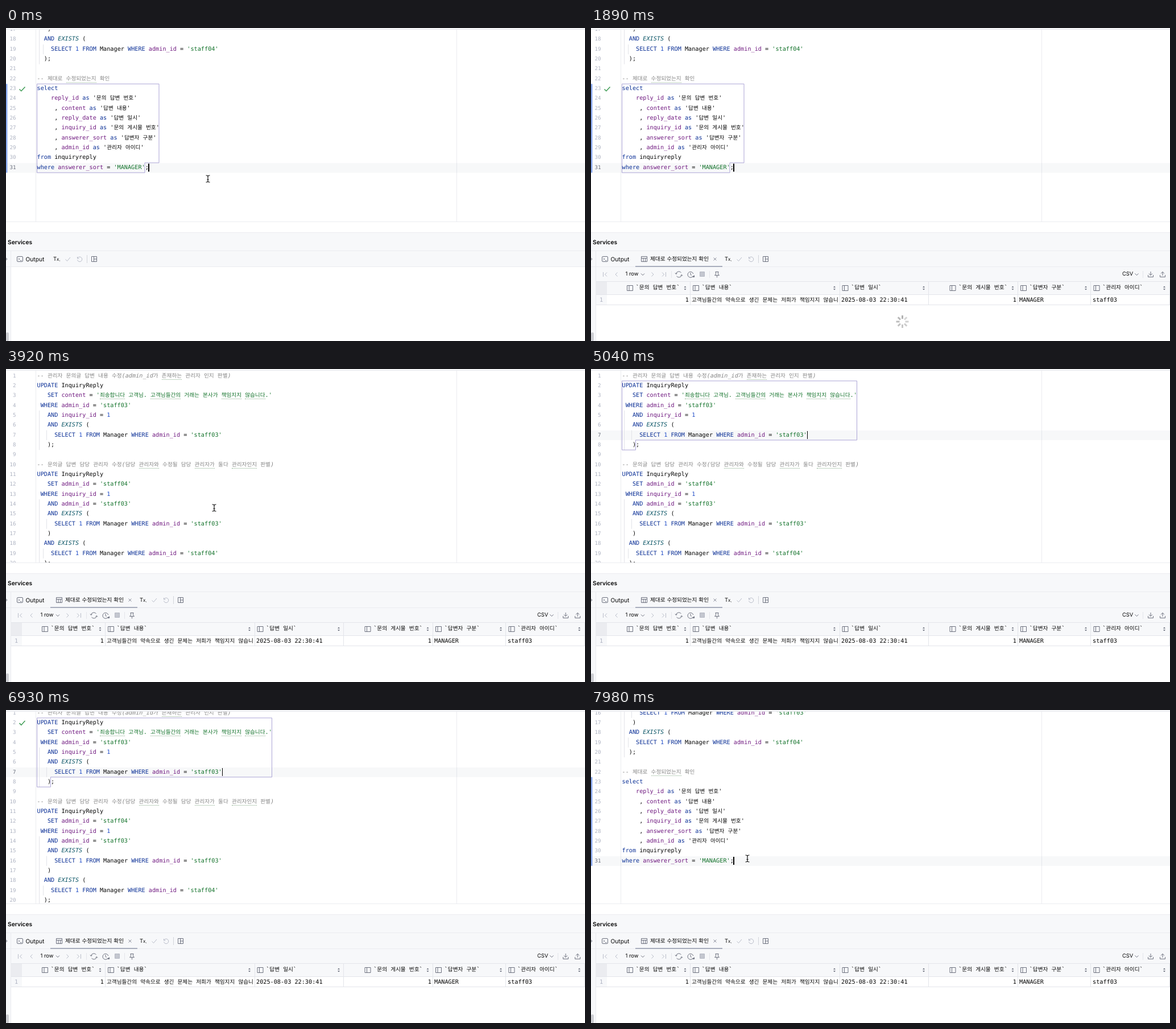
Recreate the animation shown at these times as an HTML page. Size 1018 by 550 pixels, loop 8 s.

```html
<!DOCTYPE html>
<html lang="ko">
<head>
<meta charset="utf-8">
<style>
html, body { margin: 0; width: 100%; height: 100%; overflow: hidden; background: #fff; }
body { position: relative; text-rendering: geometricPrecision; color: #050505; }
div, svg, .t { position: absolute; }
svg { left: 0; top: 0; overflow: visible; fill: none; stroke: #6c707e; }
.t { white-space: pre; line-height: 18px; font: 10.23px/18px Inter, sans-serif; }
.mono, .row { font: 10.2px/17.33px "DejaVu Sans Mono", monospace; white-space: pre; }
.mono { line-height: 18px; }
.small { font-size: 9.4px; }
.k { font: normal 9.62px/0 "Noto Sans CJK KR", "Noto Sans CJK", sans-serif; }
.typo { border-bottom: 1px dotted #86ab89; }
.bold { font-weight: 600; }
.dim { color: #aeb3c2; }
.kw { color: #0a2f96; }
.fn { color: #0b5566; font-style: italic; }
.col { color: #701a80; }
.str { color: #12722a; }
.num { color: #2450c8; }
.com { color: #868686; font-style: italic; }
.marked .str .typo { border-color: transparent; }
#editor { left: 0; top: 0; width: 1018px; height: 340px; overflow: hidden; }
#doc { left: 0; top: 0; width: 1018px; height: 560px; }
#current { left: 0; width: 1018px; height: 17.33px; background: rgba(60, 80, 115, .04); }
#caret { width: 1.6px; height: 14px; background: #000; }
.no { left: 0; width: 17.6px; text-align: right; font-size: 9.2px; color: #aeb3c2; }
.no.on { color: #686c7b; }
#popup { width: 340px; border-radius: 6px; background: #fff; overflow: hidden; }
#shadow { width: 340px; border-radius: 6px; box-shadow: 0 1px 6px rgba(0, 0, 0, .32), 0 0 1px rgba(0, 0, 0, .4); }
#popup .t { left: 1px; }
</style>
</head>
<body>
<div id="editor">
  <svg width="1018" height="340"><path stroke="#ebecf0" d="M52.5 0V340M792.5 0V340"/></svg>
  <div id="doc">
    <div id="current"></div>
    <svg width="1018" height="560">
      <path id="bar" stroke="none" fill="#8aaaf0"/>
      <path id="mark" stroke="none" fill="#ccccff"/>
      <path id="guides" stroke="#e2e3e8"/>
      <path id="frame" stroke="#aca5d6"/>
      <path id="tick" d="M23.5 .5l3.3 3.3 6.7-7.3" stroke="#3f9c55" stroke-width="1.5"/>
    </svg>
    <div id="rows"></div>
    <div id="caret"></div>
  </div>
</div>
<div style="left:0;top:0;width:1018px;height:2px;background:#f7f8fa;border-bottom:1px solid #e6e7ec"></div>
<div id="shadow"></div>
<div id="popup"></div>

<svg width="1018" height="550">
  <path stroke="none" fill="#f7f8fa" d="M0 360H1018V420H8V550H0z"/>
  <path stroke="#ebecf0" d="M0 340.5H1018M0 359.5H1018M0 391.5H1018M0 419.5H1018M8.5 392V550"/>
  <path d="M-.5 403.500l2.500 2.500-2.500 2.500"/>
  <rect x="0" y="535" width="5" height="15" rx="2" fill="#cdced3" stroke="none"/>
  <rect x="19.500" y="401.500" width="10" height="9" rx="1.500"/>
  <path d="M21.800 404l2 2-2 2M25 408.500h2.500"/>
</svg>
<div id="labels"></div>
<div id="tools">
  <svg width="10" height="10">
    <path stroke="#b9bdc9" d="M104.500 406.500l3 3 5.500-6.500M125.500 402v3h3M125.800 404.500a4.200 4.200 0 1 1-.3 3"/>
    <path stroke="#d3d5db" d="M142.500 399V413"/>
    <path d="M150.500 401.500h9v9h-9zM154.500 401.500v9M154.500 406h5"/>
  </svg>
</div>
<div id="result">
  <svg width="1018" height="550">
    <path stroke="none" fill="#f7f8fa" d="M9 420H1018V468H9zM9 468H28V486H9z"/>
    <path stroke="none" fill="#ebecf0" d="M9 446H28V468H9z"/>
    <path stroke="#e3e5ea" d="M9 445.500H1018M9 468.500H1018M9 486.500H1018M174.500 446V486M437.500 446V486M593.500 446V486M750.500 446V486M878.500 446V486M1017.500 446V486M141.500 427V439M208.500 427V439M970.500 427V439"/>
    <path stroke="#a8adbd" stroke-width="2" d="M78 419H231"/>
    <path d="M88.500 401.500h10v9h-10zM88.500 404.500h10M92 404.500v6M95.500 404.500v6"/>
    <path stroke="#8b8f9c" d="M215.500 403.500l5 5m0-5l-5 5"/>
    <path stroke="#b9bdc9" d="M21.500 429v8M28 429.500l-3.500 3.500 3.500 3.500M46.500 429.500l-3.500 3.500 3.500 3.500M106.500 429.500l3.500 3.500-3.500 3.500M125 429.500l3.500 3.500-3.500 3.500M131.500 429v8"/>
    <path d="M88 431.500l3 3 3-3M956.500 431.500l3 3 3-3"/>
    <path d="M149.500 432a5 5 0 0 1 9-2M159.500 434a5 5 0 0 1-9 2M148 430.500l1.500 2 2-1.500M161 435.500l-1.500-2-2 1.500"/>
    <path d="M179.500 435.500a5 5 0 1 1 .3-3.500M175 430v3.500l2 1"/>
    <path stroke="none" fill="#6c707e" d="M178 438h4v-4z"/>
    <path fill="#c3c6cf" stroke="#b4b8c3" d="M191.500 428.500h8v8h-8z"/>
    <path d="M218.500 428.500h6M219.500 428.500v4l-2 2h8l-2-2v-4M221.500 434.500v4"/>
    <path d="M984 428v6.500m-3-3l3 3 3-3M979.500 434v3.500h9v-3.500M1005 435v-6.500m-3 3l3-3 3 3M1000.500 434v3.500h9v-3.500"/>
    <g id="heads"></g>
    <g id="spinner" stroke-width="3"></g>
  </svg>
</div>
<svg width="20" height="20"><path id="pointer" stroke="#111" stroke-width="1.200" d="M-3.500-6Q0-6.200 0-4Q0-6.200 3.500-6M0-5V5M-3.500 6Q0 6.200 0 4Q0 6.200 3.500 6M-1.500 1.500h3"/></svg>

<script>
const $ = id => document.getElementById(id);
const PITCH = 17.33, STEP = 70, LOOP = 8000;
const rowTop = n => 3.6 + (n - 1) * PITCH;

const code = `-- 관리자 문의글 답변 내용 수정(admin_id가 존재하는 관리자 인지 판별)
UPDATE InquiryReply
   SET content = '죄송합니다 고객님. 고객님들간의 거래는 본사가 책임지지 않습니다.'
 WHERE admin_id = 'staff03'
   AND inquiry_id = 1
   AND EXISTS (
     SELECT 1 FROM Manager WHERE admin_id = 'staff03'
   );

-- 문의글 답변 담당 관리자 수정(담당 관리자와 수정될 담당 관리자가 둘다 관리자인지 판별)
UPDATE InquiryReply
   SET admin_id = 'staff04'
 WHERE inquiry_id = 1
   AND admin_id = 'staff03'
   AND EXISTS (
     SELECT 1 FROM Manager WHERE admin_id = 'staff03'
   )
  AND EXISTS (
    SELECT 1 FROM Manager WHERE admin_id = 'staff04'
  );

-- 제대로 수정되었는지 확인
select
    reply_id as '문의 답변 번호'
     , content as '답변 내용'
     , reply_date as '답변 일시'
     , inquiry_id as '문의 게시물 번호'
     , answerer_sort as '답변자 구분'
     , admin_id as '관리자 아이디'
from inquiryreply
where answerer_sort = 'MANAGER';`.split('\n');

const typos = /^(존재하는|죄송합니다|고객님들간의|책임지지|않습니다|관리자와|관리자가|관리자인지|수정되었는지)$/;
const hangul = (s, check) => s.replace(/[가-힣]+/g, w =>
  `<span class="k${check && typos.test(w) ? ' typo' : ''}">${w}</span>`);

// Column aliases after "as" keep the plain text colour
const token = /(?<com>--.*)|(?<alias>(?<=as )'[^']*')|(?<str>'[^']*')|(?<kw>\b(?:UPDATE|SET|WHERE|AND|SELECT|FROM|select|as|from|where)\b)|(?<fn>EXISTS)|(?<col>\w+_\w+|content)|(?<num>\b\d+\b)/g;
const paint = line => line.replace(token, (s, ...rest) => {
  const groups = rest.pop();
  const kind = Object.keys(groups).find(key => groups[key]);
  return `<span class="${kind}">${hangul(s, true)}</span>`;
});

$('rows').innerHTML = code.map((line, i) => {
  const top = `top:${rowTop(i + 1)}px`;
  return `<div class="row no" style="${top}">${i + 1}</div>` +
    `<div class="row" style="left:54.500px;${top}">${paint(line)}</div>`;
}).join('');
const numbers = [...document.querySelectorAll('.no')];

const span = (x, from, to) => `M${x} ${rowTop(from)}V${rowTop(to + 1)}`;
$('guides').setAttribute('d', span(58.5, 5, 8) + span(58.5, 14, 20) + span(71.5, 7, 7) + span(71.5, 16, 16) + span(65.5, 19, 19));
$('bar').setAttribute('d', `M0 ${rowTop(23)}H2.500V${rowTop(32)}H0z`);

// Text placed by its left edge (or right edge) and vertical centre
const text = (x, y, s, cls = '', side = 'left') =>
  `<span class="t ${cls}" style="${side}:${side == 'right' ? 1018 - x : x}px;top:${y - 9}px">${hangul(s)}</span>`;
const add = (id, ...parts) => $(id).insertAdjacentHTML('beforeend', parts.join(''));

add('labels', text(3, 376.5, 'Services', 'bold'), text(34.5, 406.5, 'Output'));
$('result').style.cssText = $('labels').style.cssText = 'left:0;top:0;width:1018px';
add('tools', text(83, 406, 'T<span style="font-size:8px">x</span><span style="font-size:6px">,</span>', 'small'));
const cell = (x, s, cls = '', side) => text(x, 478.7, s, 'mono ' + cls, side);
add('result',
  text(104, 406, '제대로 수정되었는지 확인'), text(60.5, 433, '1 row', 'small'), text(934, 433, 'CSV', 'small'),
  cell(15, '1', 'dim'), cell(172, '1', '', 'right'),
  cell(177, '고객님들간의 약속으로 생긴 문제는 저희가 책임지지 않습니'),
  cell(440, '2025-08-03 22:30:41'), cell(748, '1', '', 'right'),
  cell(753, 'MANAGER'), cell(882, 'staff03'));

const heads = [[63, 165.5, '문의 답변 번호'], [179, 428, '답변 내용'], [441.5, 585, '답변 일시'],
  [630.5, 741.5, '문의 게시물 번호'], [755, 870, '답변자 구분'], [883.5, 1008, '관리자 아이디']];
for (const [x, sort, name] of heads) {
  add('result', text(x + 15.7, 457.3, '`' + name + '`', 'mono'));
  add('heads', `<path d="M${x + .5} 452.500h10v9h-10zM${x + 4} 452.500v9"/>` +
    `<path stroke="none" fill="#6c707e" d="M${sort - 2} 456h4l-2-2.500zM${sort - 2} 458h4l-2 2.500z"/>`);
}
for (let i = 0; i < 8; i++)
  add('spinner', `<path stroke="hsl(0 0% ${70 + i * 2}%)" d="M0-5V-11" transform="rotate(${-45 * i})"/>`);

const statements = {
  query: {
    first: 23, last: 31, wide: 269, end: 244, line: 31, caret: 250.4, x: 251, y: 254, pick: 0,
    items: ["select reply_id as '문의 답변 번호' , content as '답변...", "-- 제대로 수정되었는지 확인 select reply_id as '문의 답변..."]
  },
  update: {
    first: 2, last: 8, wide: 467.5, end: 78.5, line: 7, caret: 379.8, x: 379.5, y: 124.5, pick: 1,
    items: ["SELECT 1 FROM Manager WHERE admin_id = 'staff03'", "UPDATE InquiryReply SET content = '죄송합니다 고객님. 고객님들...",
      '-- 관리자 문의글 답변 내용 수정(admin_id가 존재하는 관리자 인지 판별) UPDA...']
  }
};

const outline = (s, wide) =>
  `M54.500 ${rowTop(s.first)}H${wide}V${rowTop(s.last)}H${s.end}V${rowTop(s.last + 1)}H54.500z`;

let shown;
function fillPopup(s) {
  if (shown == s) return;
  shown = s;
  const foot = 31 + s.items.length * 19 + 5.5;
  $('popup').innerHTML =
    `<div style="left:0;width:340px;top:${31 + 18.7 * s.pick}px;height:18.700px;background:#d2e0fd"></div>` +
    `<div style="left:0;width:340px;top:${foot}px;height:17px;background:#f7f8fa"></div>` +
    '<span class="t bold" style="left:0;top:7px;width:340px;text-align:center">Statements</span>' +
    s.items.map((item, i) => `<span class="t" style="top:${31.5 + 18.8 * i}px">${hangul(item)}</span>`).join('') +
    `<span class="t" style="left:2.500px;top:${foot - 1.5}px;color:#315fbd">Customize</span>`;
  for (const id of ['popup', 'shadow'])
    Object.assign($(id).style, { left: s.x + 'px', top: s.y + 'px', height: foot + 16 + 'px' });
}

// Linear interpolation through [time, ...values]
function along(keys, t) {
  const i = keys.findIndex(k => k[0] > t);
  if (i < 0) return keys.at(-1).slice(1);
  if (!i) return keys[0].slice(1);
  const a = keys[i - 1], b = keys[i], f = (t - a[0]) / (b[0] - a[0]);
  return a.slice(1).map((v, j) => v + (b[j + 1] - v) * f);
}
const scrollKeys = [[2870, 286.6], [2940, 281], [3010, 266], [3080, 245], [3360, 110], [3570, 25], [3710, 0],
  [6860, 0], [6930, 7], [7000, 25], [7140, 75], [7350, 170], [7560, 245], [7700, 264], [7980, 267]];
const pointerKeys = [[0, 355, 265], [70, 357, 263], [210, 362, 261], [350, 363, 260], [420, 367, 250],
  [3780, 367, 250], [3920, 366, 244], [4130, 385, 170], [4340, 400, 107], [4480, 400, 107], [4760, 412, 115],
  [5040, 412, 115], [7770, 278, 263], [7980, 275, 261]];

const within = (t, ...ranges) => ranges.some(([a, b]) => t >= a && t < b);
const show = (id, on) => $(id).style.display = on ? '' : 'none';

function draw(now) {
  const t = Math.floor(now % LOOP / STEP) * STEP;
  const s = within(t, [4620, 7910]) ? statements.update : statements.query;
  const popup = within(t, [1330, 1820], [5600, 6090]);
  const result = t >= 1890;

  $('doc').style.transform = `translateY(${-along(scrollKeys, t)[0]}px)`;
  $('doc').classList.toggle('marked', popup);
  $('current').style.top = rowTop(s.line) + 'px';
  numbers.forEach((n, i) => n.classList.toggle('on', i + 1 == s.line));
  $('caret').style.left = s.caret + 'px';
  $('caret').style.top = rowTop(s.line) + 1.7 + 'px';
  show('caret', !within(t, [420, 980], [1470, 1820], [2450, 2940], [5110, 6090]));

  $('frame').setAttribute('d', outline(s, s.wide));
  show('frame', within(t, [0, 4620], [5040, 7910]));
  $('mark').setAttribute('d', outline(s, 1018));
  show('mark', popup);
  $('tick').setAttribute('transform', `translate(0 ${rowTop(s.first) + PITCH / 2})`);
  show('tick', within(t, [0, 4620], [6160, 7910]));

  if (popup) fillPopup(s);
  show('popup', popup);
  show('shadow', popup);

  show('result', result);
  $('tools').style.left = result ? '152px' : '0';
  show('spinner', t < 2450);
  const turns = [1960, 2030, 2170, 2380].filter(k => k <= t).length;
  $('spinner').setAttribute('transform', `translate(547.5 516) rotate(${45 * turns})`);

  $('pointer').setAttribute('transform', `translate(${along(pointerKeys, t)})`);
  show('pointer', within(t, [0, 420], [3780, 5040], [7770, LOOP]));
}

const start = performance.now();
(function tick() {
  draw(performance.now() - start);
  requestAnimationFrame(tick);
})();
</script>
</body>
</html>
```
